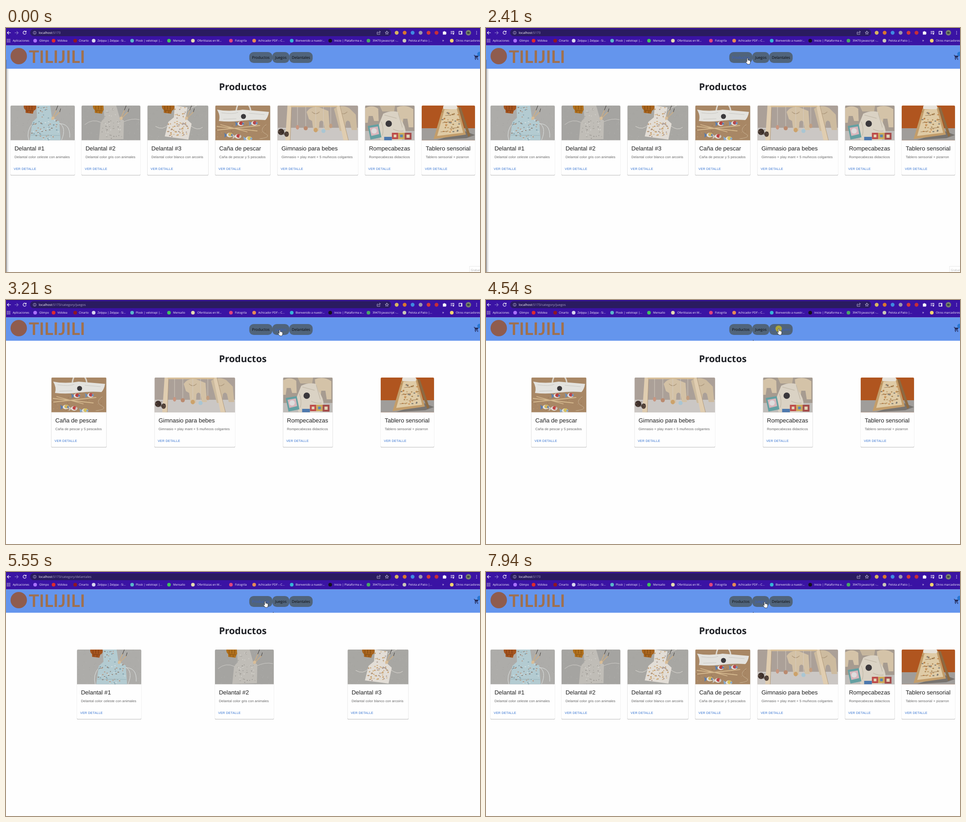
An HTML page that plays this animation: 1041 px wide and 538 px high, repeating every 8 s.

```html
<!DOCTYPE html>
<html lang="es">
<head>
<meta charset="utf-8">
<title>Productos</title>
<style>
html, body { margin: 0; width: 100%; height: 100%; overflow: hidden; background: #fefefe; }
svg { display: block; width: 1041px; height: 538px; text-rendering: geometricPrecision; }
.ui { font-family: 'Open Sans', 'Noto Sans', sans-serif; }
.marks { font-weight: 500; }
.card { font-family: 'Liberation Sans', Arial, sans-serif; }
.brand { font: bold 38px Lato, sans-serif; }
</style>
</head>
<body>
<svg id="stage" viewBox="0 0 1041 538" xmlns="http://www.w3.org/2000/svg"></svg>
<script>
const LOOP = 8000, FRAME = 200 / 3;
const stage = document.getElementById('stage');

// Drawing helpers that return SVG markup
const rect = (x, y, w, h, fill, r = 0, more = '') =>
  `<rect x="${x}" y="${y}" width="${w}" height="${h}" rx="${r}" fill="${fill}" ${more}/>`;
const dot = (x, y, r, fill, ry = r) => `<ellipse cx="${x}" cy="${y}" rx="${r}" ry="${ry}" fill="${fill}"/>`;
const shape = (d, fill) => `<path d="${d}" fill="${fill}"/>`;
const line = (d, color, w = 1) =>
  `<path d="${d}" fill="none" stroke="${color}" stroke-width="${w}" stroke-linecap="round"/>`;
const text = (x, y, size, fill, str, more = '') =>
  `<text x="${x}" y="${y}" font-size="${size}" fill="${fill}" ${more}>${str}</text>`;

function random(seed) {
  return () => (seed = (seed * 16807) % 2147483647) / 2147483647;
}

function specks(seed, n, x, y, w, h, colors, r) {
  const rnd = random(seed);
  let out = '';
  for (let i = 0; i < n; i++) {
    const c = colors[i % colors.length];
    out += dot((x + rnd() * w).toFixed(1), (y + rnd() * h).toFixed(1), r * (0.7 + rnd() * 0.6), c, r * 0.7);
  }
  return out;
}

// Pictures on the cards, 76.5 high
const cloth = (w, color, seed) =>
  rect(0, 0, w, 77, color) + specks(seed, 120, 0, 0, w, 77, ['#b9b8b5', '#9d9c99'], 0.7);
const cap = (x, color, shade) =>
  shape(`M${x} 0H${x + 27}Q${x + 29} 9 ${x + 22} 11L${x + 20} 18 ${x + 4} 16 ${x + 4} 10Q${x - 1} 6 ${x} 0Z`, color) +
  line(`M${x + 5} 10L${x + 21} 12M${x + 6} 2V8M${x + 12} 1V8M${x + 18} 1V9M${x + 8} 12V15M${x + 15} 13V16`, shade, 1.2);
const spoons = x =>
  line(`M${x} 31L${x + 9} 10M${x} 31L${x + 17} 14`, '#cfae82', 1.6) +
  dot(x + 2, 28, 3.4, '#d8bd98') + line(`M${x + 9} 10L${x + 13} 0M${x + 17} 14L${x + 19} 7`, '#3c3835', 1);
const fish = (x, y, body, fin) =>
  shape(`M${x - 4} ${y}L${x - 13} ${y - 5}Q${x - 10} ${y} ${x - 12} ${y + 6}Z`, fin) +
  dot(x, y, 7, '#e4e1dc', 5) + dot(x + 1, y - 1, 4.5, body, 4) + dot(x + 5, y, 2.4, fin);

const pictures = {
  blue: w => cloth(w, '#adaca9', 11) + cap(29, '#a4541f', '#7d3a12') +
    line('M106 38Q124 48 112 76M104 40Q132 38 130 70M48 40Q34 56 40 77', '#dfe3e2') +
    shape('M57 0H87L91 27 107 35 110 77H42L48 36 58 27Z', '#b3cbd1') +
    specks(5, 56, 47, 32, 58, 44, ['#8d8178', '#7d9ca8', '#b59580', '#d3dfe0'], 1.6) +
    specks(8, 16, 60, 3, 25, 25, ['#8d8178', '#7d9ca8', '#b59580'], 1.4) +
    line('M45 65L108 66', '#8ba6ae', 0.7) + spoons(91),
  grey: w => cloth(w, '#a5a4a1', 23) + cap(25, '#b0701d', '#855010') +
    line('M42 37Q24 28 7 42M92 36Q110 27 127 31', '#d8d6d1', 0.8) +
    shape('M48 0H76L84 28 93 33 92 74 38 76 42 36 50 28Z', '#c0bdb7') +
    specks(31, 44, 43, 32, 46, 41, ['#a7a49e', '#d8d6d0', '#8f8c87'], 1.2) +
    specks(37, 12, 51, 3, 24, 24, ['#a7a49e', '#d8d6d0'], 1.2) + spoons(85),
  white: w => cloth(w, '#a8a7a3', 41) + cap(32, '#a8641e', '#7c480f') +
    line('M46 42Q34 56 18 46M94 44Q110 57 121 48M88 10Q102 2 108 0', '#e2dfd9', 0.9) +
    shape('M60 0 88 4 84 28 97 40 90 75 38 68 46 36 58 26Z', '#e2ddd6') +
    specks(43, 56, 45, 35, 45, 34, ['#c49a68', '#d2b284', '#a8968c'], 1.7) +
    specks(47, 18, 60, 4, 24, 26, ['#c49a68', '#d2b284', '#a8968c'], 1.5) + spoons(84),
  rod: w => rect(0, 0, w, 77, '#a88765') +
    specks(53, 40, 0, 34, w, 42, ['#b4946f', '#997755'], 1.2) +
    line('M46 12Q47 4 49 0M78 12Q77 4 74 0', '#ddd8cf', 3) +
    shape('M4 9Q30 14 60 9L118 14Q116 26 110 32 88 30 62 33 34 37 8 34 12 22 4 9Z', '#e3e2de') +
    line('M14 16Q40 20 50 15M74 17L108 20M18 30L46 29', '#c6c4bf', 0.9) + dot(62, 24, 5.5, '#3b393c') +
    line('M4 46L92 56M5 54L98 44M12 42L70 58', '#d4b88e', 1.8) +
    line('M112 42Q95 54 110 62T98 73', '#d5c3a6', 0.7) +
    fish(56, 40, '#b83f3d', '#5d7fae') + fish(86, 39, '#b8484c', '#6d8fb6') + fish(32, 65, '#d3b45a', '#5c7ba8') +
    fish(50, 68, '#bf4343', '#c9c4bd') + fish(74, 73, '#d8c25c', '#86a9cc'),
  gym: w => rect(0, 0, w, 77, '#aba098') + rect(0, 49, w, 28, '#cbc7c4') +
    shape('M64 14Q74 0 92 4L112 12 115 54H104L101 36Q96 30 92 37L91 56H79L76 34 69 30Z', '#d3c1a5') +
    shape('M124 7Q142-4 158 6L172 20 175 54H163L159 36Q154 30 150 37L148 56H137Z', '#cdbb9f') +
    line('M76 14Q84 22 92 14M137 15Q145 22 153 14', '#ab967a', 1.1) +
    shape('M22 0H31L28 77H17ZM129 0H137L156 77H145Z', '#e0cdb0') +
    line('M31 0L28 77M137 0L156 77', '#a99072', 0.8) + rect(29, 0, 102, 3.5, '#d8bf98') +
    line('M44 3V43M62 3V47M84 3V50M101 3V50M117 3V42', '#d6cfc3', 0.9) +
    dot(44, 48, 3.5, '#c9957f', 5) + dot(62, 50, 4.5, '#ba8a6f') + dot(84, 54, 4.5, '#cca26b', 5) +
    dot(101, 56, 4.5, '#a9c6d3') + dot(117, 45, 3.5, '#c29d7f', 5) +
    dot(8, 58, 7, '#41332d') + dot(20, 63, 5, '#54443b', 6) +
    specks(71, 14, 3, 52, 20, 14, ['#75604f', '#2c221f'], 1.1),
  puzzle: w => rect(0, 0, w, 77, '#a69b90') +
    shape('M0 6Q16-3 29 7L30 34H20L17 23H8L6 38H0ZM70 4Q88-4 106 8V48H96L93 29H84L82 46H73Z', '#d4c3a8') +
    shape('M32 0H66L64 13H38Z', '#c6b69d') + rect(0, 56, w, 21, '#c0bdba') +
    shape('M40 18Q56 10 72 14L78 30Q90 46 89 62L80 77H34L28 48Z', '#dad2c4') +
    line('M43 21L69 28M73 17L82 48M36 36Q42 52 38 66M62 52Q74 58 84 56', '#bdb3a2', 1.1) + dot(52, 40, 7, '#3a373b') +
    shape('M6 45 30 41 36 70 12 75Z', '#64a0a2') + shape('M10 49 28 46 31 63 14 67Z', '#d9b6bc') + dot(20, 56, 6, '#dedddd') +
    rect(59, 60, 14, 14, '#bd4c4a') + rect(73, 60, 14, 14, '#cdaa5a') + rect(87, 60, 15, 15, '#a44b4a') +
    rect(42, 69, 17, 8, '#4c78ae') + rect(63, 64, 6, 6, '#e2d3b5') + rect(77, 64, 6, 6, '#5b86b2') +
    rect(91, 64, 7, 7, '#e2d3b5'),
  board: w => rect(0, 0, w, 77, '#b0551f') + rect(0, 50, w, 27, '#a09d9a') +
    shape('M34 76 98 72 117 65 94 56Z', '#77736f') +
    shape('M80 4H86L107 66 102 69Z', '#8d6a42') +
    shape('M46 6 80 3 97 64 26 74Z', '#c39d6a') +
    shape('M50 9 77 7 91 60 34 67Z', '#dfcba6') + rect(47, 0, 31, 8, '#e6e1d8', 3) +
    specks(61, 44, 45, 13, 38, 46, ['#a6804d', '#bf9a66', '#c98a4c', '#7d7a72'], 1.8) +
    line('M52 22L72 20M46 38L64 35M62 51L82 48M42 58L54 57', '#94704a', 0.9)
};

// Each card: picture, left edge, width, title, description
const cards = [
  ['blue', 10, 141, 'Delantal #1', 'Delantal color celeste con animales'],
  ['grey', 166, 129, 'Delantal #2', 'Delantal color gris con animales'],
  ['white', 310.6, 133.6, 'Delantal #3', 'Delantal color blanco con arcoiris'],
  ['rod', 459.5, 121, 'Caña de pescar', 'Caña de pescar y 5 pescados'],
  ['gym', 596.2, 176.8, 'Gimnasio para bebes', 'Gimnasio + play mant + 5 muñecos colgantes'],
  ['puzzle', 788.5, 109, 'Rompecabezas', 'Rompecabezas didacticos'],
  ['board', 913, 117, 'Tablero sensorial', 'Tablero sensorial + pizarron']
];
const pages = {
  all: { path: '', left: cards.map(c => c[1]) },
  games: { path: '/category/juegos', left: [null, null, null, 99.6, 326.2, 608.4, 823] },
  aprons: { path: '/category/delantales', left: [156, 459, 750.2] }
};

const card = ([pic, , w, title, info], i) => `<g class="card" id="card${i}">
  ${rect(-0.5, 0.3, w + 1, 154, '#000', 2.5, 'opacity=".1"')}
  ${rect(0, 1, w, 153.1, '#000', 2.2, 'opacity=".25"')}
  ${rect(0, 0, w, 153.2, '#fefefe', 2.2)}
  <clipPath id="clip${i}"><path d="M0 76.5V2.2Q0 0 2.2 0H${w - 2.2}Q${w} 0 ${w} 2.2V76.5Z"/></clipPath>
  <g clip-path="url(#clip${i})">${pictures[pic](w)}</g>
  ${text(8.7, 98.6, 13.02, '#202020', title)}
  ${text(8.7, 116, 7.55, '#666', info, 'letter-spacing=".08"')}
  ${text(7, 142.3, 7.05, '#2f6fd0', 'VER DETALLE', 'letter-spacing=".2"')}
</g>`;

// Bookmarks: icon x, icon colour, label x, label
const bookmarks = [
  [64, '#a970ff', 73, 'Glimpo'], [104.5, '#e02b2b', 113, 'Vidolea'], [152, '#8e1822', 160, 'Cinarto'],
  [192.5, '#d9d6ee', 201, 'Zelppa | Zelppa - Si...'], [277, '#58b6c9', 285, 'Plosk | velotrapi |...'],
  [358, '#3fc45b', 367, 'Mensalio'], [410.5, '#e5dcb0', 420, 'Ofertitazas en M...'],
  [494, '#e0457b', 503, 'Fotogrila'], [545, '#e58a55', 554, 'Achicador PDF – C...'],
  [627.5, '#35b5d6', 636, 'Bienvenido a nuestr...'], [712, '#15131d', 721, 'Inicio | Plataforma e...'],
  [796, '#48a865', 805, '39470-javascript -...'], [875, '#c9c7b8', 884, 'Pelota al Patio |...'],
  [979, '#f3d36e', 988, 'Otros marcadores']
];
const extensions = [[858, '#d9b560'], [875.5, '#d9772f'], [893, '#3f8be0'], [910.5, '#9b97ab'], [928, '#d23b3b'], [945.5, '#c62f38']];

function browser() {
  let out = rect(0, 0, 1041, 38.5, '#3a13a4') + rect(0, 0, 1041, 1, '#2b0b82') + rect(53, 2.5, 793, 15.5, '#2a1b60', 7.7);
  out += line('M10 10.5H3M6 7.3L2.8 10.5 6 13.7', '#fff', 1.1) + line('M19.5 10.5H26.5M23.7 7.3L26.9 10.5 23.7 13.7', '#8d7cc9', 1.1);
  out += line('M43.8 8.3A3.5 3.5 0 1 0 44.3 11.4M44.3 6.6V9H42', '#fff', 1.1);
  out += `<circle cx="63" cy="10.5" r="3.3" fill="none" stroke="#d6d2e6" stroke-width=".7"/>` + line('M63 10.2V12M63 8.6V8.7', '#d6d2e6', 0.8);
  out += `<text x="72" y="13" font-size="7.1" fill="#a9a3c4"><tspan fill="#fff">localhost</tspan>:5173<tspan id="path"></tspan></text>`;
  out += line('M817 9H815V14H821V12M817 11.5Q818 8.5 822 8.5M820 6.5L822.3 8.5 820 10.5', '#c9c4de', 0.8);
  out += line('M836.5 6.8L837.6 9.2 840.2 9.5 838.3 11.2 838.8 13.8 836.5 12.5 834.2 13.8 834.7 11.2 832.8 9.5 835.4 9.2Z', '#e6e3f1', 0.8);
  out += extensions.map(([x, c]) => dot(x, 10.5, 4.2, c)).join('');
  out += shape('M959.5 8H961.5Q962.5 5 964 8H966.5V10.3Q968.8 11.3 966.5 12.4V14.5H959.5Z', '#fff');
  out += line('M977 7.5H983M977 10H981M977 12.5H980M983.5 7V12.5', '#fff', 1.1) + dot(982.6, 13, 1.4, '#fff');
  out += line('M995 7.3H1001.5V13.7H995ZM1000 7.3V13.7', '#fff', 1.2);
  out += dot(1015.5, 10.5, 6, '#77806f') + dot(1015.5, 10.5, 3, '#3f4a42', 2.2);
  out += [7.5, 10.5, 13.5].map(y => dot(1033.5, y, 0.8, '#fff')).join('');
  for (let i = 0; i < 9; i++) out += rect(2 + (i % 3) * 2.8, 24.3 + Math.floor(i / 3) * 2.8, 1.7, 1.7, '#c9b8d8');
  const labels = text(14.8, 30.3, 6.3, '#fff', 'Aplicaciones') + text(958, 30.2, 8, '#fff', '»') +
    bookmarks.map(([x, c, tx, label]) => dot(x, 28, 4, c) + text(tx, 30.3, 6.3, '#fff', label)).join('');
  return `<g class="ui">${out}<g class="marks">${labels}</g></g>`;
}

// Menu buttons: left, width, label
const menu = [[534.3, 50.7, 'Productos'], [585, 37.2, 'Juegos'], [622.2, 51.3, 'Delantales']];

function header() {
  let out = rect(0, 38.5, 1041, 51.3, '#6495ed');
  out += dot(28, 62, 18, '#8f5c4e') + `<text class="brand" x="50" y="76.5" fill="#a0704d">TILIJILI</text>`;
  out += menu.map(([x, w, label], i) => rect(x, 53, w, 24, '#50647b', 9.5) +
    text(x + w / 2, 68.3, 8.2, '#0a0a0c', label, `id="menu${i}" text-anchor="middle"`)).join('');
  out += shape('M1027.5 59.5H1029.5L1030.3 61H1038L1035.6 65.8H1031L1030.5 67H1037V68H1029.3L1030 65.3 1028.8 60.7H1027.5Z', '#27305f');
  out += dot(1031, 69.3, 1, '#27305f') + dot(1036, 69.3, 1, '#27305f') + dot(1040, 57.5, 5, '#2878d4');
  return `<g class="ui">${out}</g>`;
}

stage.innerHTML = `<defs><linearGradient id="edge"><stop stop-color="#777" stop-opacity=".5"/>
  <stop offset="1" stop-color="#999" stop-opacity="0"/></linearGradient></defs>` +
  rect(0, 0, 1041, 538, '#fefefe') + browser() + header() +
  text(520, 136.5, 20.8, '#1f2126', 'Productos', 'class="ui" font-weight="700" text-anchor="middle"') +
  cards.map(card).join('') +
  `<g id="overlay">${rect(0, 89.8, 7, 449, 'url(#edge)') + rect(0, 70, 1.2, 468, '#55565e', 0, 'opacity=".55"')}
    ${rect(1018, 525.5, 30, 20, '#fefefe', 0, 'stroke="#e6e6e6" stroke-width=".8"')}
    <g id="tip" class="ui">${text(1021, 535.6, 6.2, '#a8a8a8', 'Grabar')}</g></g>` +
  rect(586, 88.6, 2, 1, '#3d4653', 0, 'id="mark"') +
  `<g id="cursor"><circle id="click" cx="-.3" cy=".3" r="7" fill="#aca63b"/>
    <g fill="#fff" stroke="#15151a" stroke-width=".7" stroke-linejoin="round">
    <path id="arrow" d="M0 0V10.6L2.5 8.4 4.2 12 5.8 11.3 4.2 7.8H7.6Z"/>
    <path id="hand" d="M-1 1Q.1-.6 1.2 1V5Q2.2 4.4 3 5.3Q4 4.7 4.8 5.8Q6.4 5.4 6.5 7V9.5Q6.4 11.5 5.2 14H0Q-1 11.5-3.6 9Q-3.8 7.4-2.2 7.8L-1 9Z"/></g></g>`;

const el = id => document.getElementById(id);
const show = (id, on) => el(id).setAttribute('visibility', on ? 'visible' : 'hidden');

// Pointer route: time, x, y
const route = [
  [330, 1015, 527], [1130, 289, 160], [1265, 222, 142], [1730, 560, 70], [1800, 560, 70], [1930, 560, 71],
  [2000, 560, 71], [2400, 574, 66], [2730, 601, 65], [3390, 601, 65], [3460, 601.5, 65], [3530, 601.5, 65],
  [3600, 602, 65], [3730, 602, 65], [4060, 470, 121], [4465, 643, 63], [4930, 643, 63], [5530, 569, 64],
  [7660, 569, 64], [7730, 568.4, 64], [7800, 568.4, 64], [7930, 612, 65]
];
const clicks = [[3070, 3210], [4540, 4680], [7210, 7350]];

function pointer(t) {
  const i = route.findIndex(p => p[0] > t);
  if (i === 0) return null;
  if (i < 0) return route[route.length - 1].slice(1);
  const [t0, x0, y0] = route[i - 1], [t1, x1, y1] = route[i];
  const u = (t - t0) / (t1 - t0), k = u * u * (3 - 2 * u);
  return [x0 + (x1 - x0) * k, y0 + (y1 - y0) * k];
}

const pageAt = t => t < 3140 || t >= 7280 ? pages.all : t < 4680 ? pages.games : pages.aprons;

function draw(t) {
  const page = pageAt(t);
  el('path').textContent = page.path;
  cards.forEach((c, i) => {
    const x = page.left[i];
    show('card' + i, x != null);
    if (x != null) el('card' + i).setAttribute('transform', `translate(${x} 171)`);
  });
  show('overlay', t < 3140);
  el('tip').setAttribute('opacity', t < 70 ? 1 : 0.85);
  show('mark', t >= 4000);

  const pos = pointer(Math.floor(t / FRAME) * FRAME);
  let over = -1;
  if (pos) {
    const [x, y] = pos;
    if (y > 53 && y < 77) over = menu.findIndex(([l, w]) => x >= l && x < l + w);
    el('cursor').setAttribute('transform', `translate(${x.toFixed(1)} ${y.toFixed(1)})`);
  }
  show('arrow', pos && over < 0);
  show('hand', pos && over >= 0);
  show('click', clicks.some(([a, b]) => t >= a && t < b));
  menu.forEach((m, i) => el('menu' + i).setAttribute('fill', i === over ? '#3b5fc6' : '#0a0a0c'));
}

let start;
function tick(now) {
  start ??= now;
  draw(Math.floor(((now - start) % LOOP) / 10) * 10);
  requestAnimationFrame(tick);
}
draw(0);
requestAnimationFrame(tick);
</script>
</body>
</html>
```
